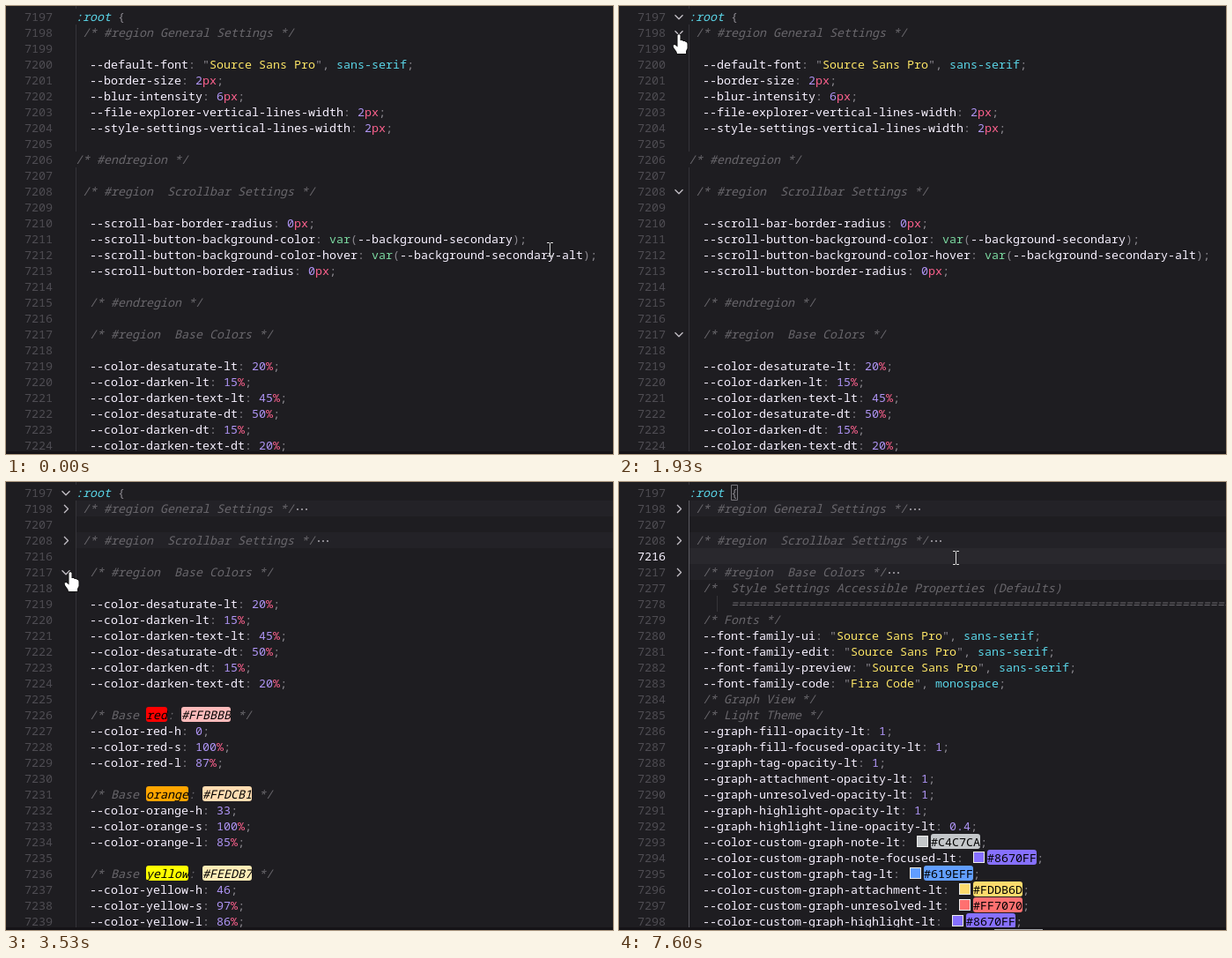
These frames come from a looping animation (689 by 508 pixels, 8 s). An HTML page with a canvas:

```html
<!DOCTYPE html>
<html lang="en">
<head>
<meta charset="utf-8">
<title>Folding regions</title>
<style>
html, body { margin: 0; width: 689px; height: 508px; overflow: hidden; background: #1e1d21; }
canvas { display: block; }
</style>
</head>
<body>
<canvas id="c" width="689" height="508"></canvas>
<script>
const ctx = document.getElementById('c').getContext('2d');
const W = 689, H = 508, LOOP = 8000, ROW = 18, TOP = 3, LEFT = 79, CH = 8, BASE = 14;
const FONT = '500 13.333px "Noto Sans Mono", "DejaVu Sans Mono", monospace';
const C = {
  bg: '#1e1d21', text: '#f7f1ff', dim: '#8b888f', comment: '#69676c', num: '#4e4c52',
  cyan: '#5ad4e6', yellow: '#fce566', purple: '#ae94f4', pink: '#fc618d', green: '#7bd8a0',
  fold: '#232227', current: '#29282d', guide: '#353439', guideOn: '#5b5a60', icon: '#c5c1c8'
};

// document
const doc = {};
const put = (n, block) => block.split('\n').forEach((s, i) => doc[n + i] = s);
put(7197, `:root {
 /* #region General Settings */

  --default-font: "Source Sans Pro", sans-serif;
  --border-size: 2px;
  --blur-intensity: 6px;
  --file-explorer-vertical-lines-width: 2px;
  --style-settings-vertical-lines-width: 2px;

/* #endregion */

 /* #region  Scrollbar Settings */

  --scroll-bar-border-radius: 0px;
  --scroll-button-background-color: var(--background-secondary);
  --scroll-button-background-color-hover: var(--background-secondary-alt);
  --scroll-button-border-radius: 0px;

  /* #endregion */

  /* #region  Base Colors */

  --color-desaturate-lt: 20%;
  --color-darken-lt: 15%;
  --color-darken-text-lt: 45%;
  --color-desaturate-dt: 50%;
  --color-darken-dt: 15%;
  --color-darken-text-dt: 20%;
`);
[['red', '#FFBBBB', 0, 100, 87], ['orange', '#FFDCB1', 33, 100, 85], ['yellow', '#FEEDB7', 46, 97, 86]]
  .forEach(([name, hex, h, s, l], i) => put(7226 + i * 5, `  /* Base ${name}: ${hex} */
  --color-${name}-h: ${h};
  --color-${name}-s: ${s}%;
  --color-${name}-l: ${l}%;
`));
put(7277, `  /*  Style Settings Accessible Properties (Defaults)
      ${'='.repeat(74)}
  /* Fonts */
  --font-family-ui: "Source Sans Pro", sans-serif;
  --font-family-edit: "Source Sans Pro", sans-serif;
  --font-family-preview: "Source Sans Pro", sans-serif;
  --font-family-code: "Fira Code", monospace;
  /* Graph View */
  /* Light Theme */
  --graph-fill-opacity-lt: 1;
  --graph-fill-focused-opacity-lt: 1;
  --graph-tag-opacity-lt: 1;
  --graph-attachment-opacity-lt: 1;
  --graph-unresolved-opacity-lt: 1;
  --graph-highlight-opacity-lt: 1;
  --graph-highlight-line-opacity-lt: 0.4;
  --color-custom-graph-note-lt: #C4C7CA;
  --color-custom-graph-note-focused-lt: #8670FF;
  --color-custom-graph-tag-lt: #619EFF;
  --color-custom-graph-attachment-lt: #FDDB6D;
  --color-custom-graph-unresolved-lt: #FF7070;
  --color-custom-graph-highlight-lt: #8670FF;`);

// first line, last hidden line, time of folding
const folds = [[7198, 7206, 2130], [7208, 7215, 3070], [7217, 7276, 4030]];
const foldable = [7197, 7198, 7208, 7217, 7277];
const CLICK = 5130;
const blinks = [5600, 6100, 6630, 7100, 7600];

// pointer hotspot: time, x, y
const path = [
  [0, 617, 276], [30, 617, 276], [670, 72, 104], [830, 59, 88], [870, 58, 84],
  [1230, 19, 28], [1330, 19, 28], [1630, 55, 32], [1770, 55, 32], [1930, 68, 32],
  [2150, 68, 32], [2330, 69, 50], [2500, 69, 50], [2630, 67, 69], [3100, 67, 69],
  [3530, 73, 102], [4030, 73, 102], [4430, 382, 86], [LOOP, 382, 86]
];

const clamp = v => Math.max(0, Math.min(1, v));

function pointer(t) {
  const i = path.findIndex(p => p[0] > t);
  const [t0, x0, y0] = path[i - 1], [t1, x1, y1] = path[i];
  const u = (t - t0) / (t1 - t0), k = u * u * (3 - 2 * u);
  return [x0 + (x1 - x0) * k, y0 + (y1 - y0) * k];
}

function rect(x, y, w, h, color) {
  ctx.fillStyle = color;
  ctx.fillRect(x, y, w, h);
}

function write(s, x, y, color, italic) {
  ctx.font = (italic ? 'italic ' : '') + FONT;
  ctx.fillStyle = color;
  ctx.fillText(s, x, y);
}

function chip(s, x, top, color, italic) {
  ctx.fillStyle = color;
  ctx.beginPath();
  ctx.roundRect(x, top, s.length * CH, 17, 3);
  ctx.fill();
  write(s, x, top + BASE, '#000', italic);
}

function drawComment(s, top) {
  const start = s.search(/\S/);
  write(s.slice(start), LEFT + start * CH, top + BASE, C.comment, true);
  const m = s.match(/Base (\w+): (#\w+)/);
  if (!m) return;
  chip(m[1], LEFT + s.indexOf(m[1]) * CH, top, m[1], true);
  chip(m[2], LEFT + s.indexOf(m[2]) * CH, top, m[2], true);
}

const tokens = /(--[\w-]+)|("[^"]*")|(#[0-9A-F]{6})|(\d+\.?\d*)|(px|%)|(var)|([a-z-]+)|(\S)/g;
const tokenColors = [C.text, C.yellow, '', C.purple, C.pink, C.green, C.cyan, C.dim];

function drawCode(s, top) {
  const y = top + BASE;
  if (s.startsWith(':root')) {
    write(':root', LEFT, y, C.cyan, true);
    write('{', LEFT + 6 * CH, y, C.dim);
    return;
  }
  let shift = 0;
  for (const m of s.matchAll(tokens)) {
    const kind = m.slice(1).findIndex(g => g !== undefined);
    const x = LEFT + m.index * CH + shift, word = m[0];
    if (kind === 2) {
      rect(x + 3, y - 12, 13, 13, '#eee');
      rect(x + 4, y - 11, 11, 11, word);
      shift = 19;
      chip(word, x + shift, top, word);
    } else if (kind === 1) {
      write('"', x, y, C.dim);
      write(word.slice(1, -1), x + CH, y, C.yellow);
      write('"', x + (word.length - 1) * CH, y, C.dim);
    } else {
      write(word, x, y, tokenColors[kind]);
    }
  }
}

function chevron(y, folded, alpha) {
  ctx.globalAlpha = alpha;
  ctx.strokeStyle = C.icon;
  ctx.lineWidth = 1.3;
  ctx.beginPath();
  if (folded) {
    ctx.moveTo(66, y - 4.5); ctx.lineTo(70.5, y); ctx.lineTo(66, y + 4.5);
  } else {
    ctx.moveTo(63.5, y - 2.2); ctx.lineTo(68, y + 2.2); ctx.lineTo(72.5, y - 2.2);
  }
  ctx.stroke();
  ctx.globalAlpha = 1;
}

function drawRow(n, i, t, fade) {
  const top = TOP + i * ROW, s = doc[n] || '';
  const fold = folds.find(f => f[0] === n);
  const folded = fold && t >= fold[2];
  const clicked = t >= CLICK, active = clicked && n === 7216;

  if (folded) rect(LEFT, top, W - LEFT, ROW, C.fold);
  if (active) rect(LEFT, top, W - LEFT, ROW, C.current);
  if (n !== 7197 && n !== 7206) rect(79, top, 1, ROW, clicked ? C.guideOn : C.guide);
  if (n === 7278) rect(111, top, 1, ROW, C.guide);
  if (n === 7197 && clicked) {
    ctx.strokeStyle = '#77757b';
    ctx.lineWidth = 1;
    ctx.strokeRect(127.5, top + 0.5, 7, 17);
  }

  write(String(n), 21, top + BASE, active ? C.text : C.num);
  if (/^\s*(\/\*|=)/.test(s)) drawComment(s, top);
  else drawCode(s, top);

  if (folded) {
    const end = LEFT + s.length * CH;
    for (let k = 0; k < 3; k++) rect(end + 3 + k * 5, top + 9, 2, 2, C.dim);
  }
  if (foldable.includes(n)) chevron(top + 9.5, folded, folded ? 1 : fade);
  if (active && blinks.filter(b => b <= t).length % 2 === 0) rect(79, top, 2, ROW, C.text);
}

function shape(points, x, y) {
  ctx.beginPath();
  points.forEach(([px, py]) => ctx.lineTo(x + px, y + py));
  ctx.closePath();
  ctx.lineJoin = 'round';
  ctx.strokeStyle = '#111';
  ctx.lineWidth = 1.6;
  ctx.stroke();
  ctx.fillStyle = '#fff';
  ctx.fill();
}

const arrow = [[0, 0], [0, 16], [4, 12.5], [6.5, 18], [9, 17], [6.5, 11.6], [11.5, 11.6]];
const hand = [
  [-1.5, 1], [0, 0], [1.5, 1], [1.5, 7], [4, 7], [4.6, 8], [7, 8], [7.6, 9], [9, 9.3], [9.5, 11],
  [9.5, 16], [8, 19], [8, 22], [-2, 22], [-2.5, 20], [-6, 15], [-6.4, 12.5], [-4.5, 12], [-1.5, 14.5]
];

function beam(x, y) {
  for (const dy of [-8, 7]) {
    rect(x - 3, y + dy, 3, 1, '#ddd');
    rect(x + 1, y + dy, 3, 1, '#ddd');
  }
  rect(x, y - 7, 1, 14, '#ddd');
}

function draw(t) {
  const [x, y] = pointer(t).map(Math.round);
  const fade = clamp((t - 600) / 500) * (1 - clamp((t - 4100) / 330));

  rect(0, 0, W, H, C.bg);
  rect(79, 0, 1, TOP, C.guide);
  let n = 7197;
  for (let i = 0; i < 28; i++) {
    drawRow(n, i, t, fade);
    const fold = folds.find(f => f[0] === n && t >= f[2]);
    n = (fold ? fold[1] : n) + 1;
  }
  rect(0, 505, W, 3, '#151317');
  if (t >= folds[2][2]) rect(426, 507, 55, 1, '#a3a4a8');

  if (x > 82) beam(x, y);
  else shape(t > 1850 ? hand : arrow, x, y);
}

function tick(now) {
  draw(now % LOOP);
  requestAnimationFrame(tick);
}
draw(0);
requestAnimationFrame(tick);
</script>
</body>
</html>
```
